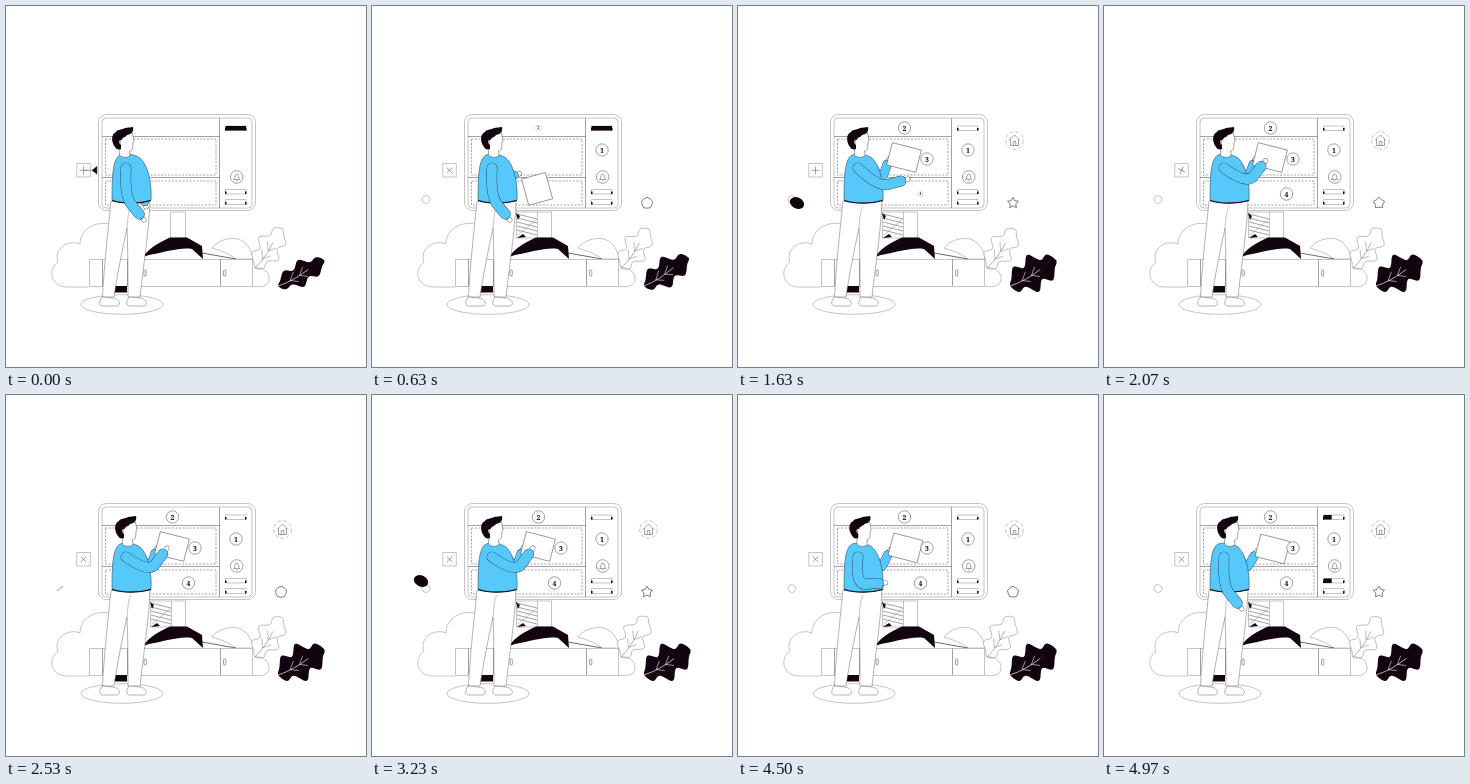
An HTML page with a canvas that plays this animation: 360 by 361 pixels, repeating every 5 s.

```html
<!DOCTYPE html>
<html lang="en">
<head>
<meta charset="utf-8">
<title>Planning a page layout</title>
<style>
html, body { margin: 0; width: 100%; height: 100%; overflow: hidden; background: #fff; }
canvas { display: block; width: 360px; height: 361px; }
</style>
</head>
<body>
<canvas id="stage"></canvas>
<script>
const LOOP = 5000, TAU = Math.PI * 2;
const INK = '#13050f', BLUE = '#56c8fa', LINE = '#444', SOFT = '#888';
const canvas = document.getElementById('stage');
const c = canvas.getContext('2d');
const dpr = window.devicePixelRatio || 1;
canvas.width = 360 * dpr;
canvas.height = 361 * dpr;

let t = 0; // time within the loop, in ms

const clamp = u => Math.max(0, Math.min(1, u));
const ease = u => u * u * (3 - 2 * u);
const ramp = (from, to) => ease(clamp((t - from) / (to - from)));
const pulse = (mid, half) => ease(clamp(1 - Math.abs(t - mid) / half));
const mix = (a, b, u) => a.map((v, i) => v + (b[i] - v) * u);

// Scale that grows with a small overshoot.
function pop(start) {
  const u = clamp((t - start) / 400) - 1;
  return 1 + 2.4 * u ** 3 + 1.4 * u ** 2;
}

function shape(d, fill, stroke = LINE, width = 0.5) {
  const p = typeof d === 'string' ? new Path2D(d) : d;
  if (fill) { c.fillStyle = fill; c.fill(p); }
  if (stroke) { c.strokeStyle = stroke; c.lineWidth = width; c.stroke(p); }
}

function box(x, y, w, h, fill, r = 0, stroke = LINE) {
  const p = new Path2D();
  p.roundRect(x, y, w, h, r);
  shape(p, fill, stroke);
}

function oval(x, y, rx, ry, fill, stroke = LINE, turn = 0) {
  const p = new Path2D();
  p.ellipse(x, y, rx, ry, turn, 0, TAU);
  shape(p, fill, stroke);
}

function at(x, y, turn, scale, draw) {
  if (scale <= 0) return;
  c.save();
  c.translate(x, y);
  c.rotate(turn);
  c.scale(scale, scale);
  draw();
  c.restore();
}

function badge(n, x, y) {
  at(x, y, 0, pop(80 + 503 * (n - 1)), () => {
    oval(0, 0, 6.2, 6.2, '#fff');
    c.fillStyle = INK;
    c.font = 'bold 7px "Noto Serif", "Liberation Serif", serif';
    c.textAlign = 'center';
    c.fillText(n, 0, 2.6);
  });
}

// A form field with dark ends and a fill running from the left.
function field(y, h, fill) {
  box(219.5, y, 20.5, h, '#fff', 0, SOFT);
  c.fillStyle = INK;
  c.fillRect(219.5, y, 20.5 * fill, h);
  for (const x of [219, 239]) c.fillRect(x, y + h - 2.5, 1.5, 2.5);
}

function monitor() {
  box(92.5, 108.5, 157, 96, '#fff', 8, SOFT);
  box(96, 112, 150, 90, '#fff', 4, SOFT);
  shape('M96 130.5H213.5M96 171.5H213.5M213.5 112V202');
  c.setLineDash([2, 1.5]);
  box(99.5, 133, 110.5, 36);
  box(99.5, 175, 110.5, 24);
  c.setLineDash([]);
  const refill = 0.4 * ramp(4750, 4970);
  field(120, 4.5, 1 - ramp(800, 1150) + refill);
  field(183.5, 4.5, refill);
  field(193.5, 5, 0);
  oval(230.7, 171, 6.3, 6.3, '#fff');
  shape('M227.5 173.5q1.4 -1 1.4 -3q0 -2.5 1.8 -2.5t1.8 2.5q0 2 1.4 3zM230 175h1.5');
}

function desk() {
  shape('M83 281H61C45 281 41 264 52 256C47 243 62 233 74 238C74 224 88 215 103 218', null, SOFT);
  oval(116, 298.5, 41, 9.8, '#fff', SOFT);
  box(164.5, 206, 15, 26, '#fff', 0, SOFT);
  if (t > 250) {
    box(144.5, 206, 21, 26, '#fff', 0, SOFT);
    for (let y = 208; y < 228; y += 4) shape(`M145 ${y}L165 ${y + 5}`);
    shape('M146 229L165 213', null, SOFT);
    shape('M144 207l4 3-2 4zM145 232l6 -4 3 3z', INK, null);
  }
  shape('M137 251C143 242 154 236 164 231.5H181L196 240L197 253L186 243C174 241 160 246 143 249Z', INK, null);
  shape('M206 242C211 235 222 231 232 233C241 236 246 244 247 253H230C222 247 215 245 206 242Z', '#fff', SOFT);
  shape('M196 247L230 253', null, LINE, 0.8);
  box(83.5, 253.5, 163, 27, '#fff', 0, SOFT);
  shape('M96.5 253.5V280M121.5 253.5V280M214.5 253.5V280');
  for (const x of [138, 217.5]) box(x, 264, 2.3, 6, null, 1);
  c.fillStyle = INK;
  c.fillRect(108, 280, 13, 6.5);
}

// Lobed leaf growing from (x, y); the two edges ripple out of step.
function leaf(x, y, turn, length, width, fill, vein) {
  const edge = new Path2D(), steps = 40;
  for (let i = 0; i <= 2 * steps; i++) {
    const upper = i <= steps, u = (upper ? i : 2 * steps - i) / steps;
    const ripple = 1 + 0.33 * Math.cos(TAU * 2.8 * (u - (upper ? 0.57 : 0.42)));
    const half = width * Math.sin(Math.PI * u) ** 0.55 * ripple;
    edge.lineTo(length * u, upper ? -half : half);
  }
  edge.closePath();
  at(x, y, turn, 1, () => {
    shape(edge, fill, fill === INK ? null : SOFT);
    shape(`M0 0Q${length * 0.3} 3 ${length * 0.65} 0`, null, vein, 0.6);
    for (const u of [0.25, 0.45]) shape(`M${length * u} 1l7 -6m-7 6l7 5`, null, vein);
  });
}

function plant() {
  leaf(249, 262, -0.96 + 0.03 * Math.sin(TAU * t / LOOP), 48, 11, '#fff', SOFT);
  shape('M249 262C258 261 264 267 263 274C262 280 255 282 247 280', null, SOFT);
  leaf(272, 280, -0.5 - 0.06 * pulse(700, 700), 53, 10 + 4.5 * ramp(0, 1500), INK, '#fff');
}

function icons() {
  // Plus that turns into a cross and back
  box(70.8, 157.5, 13.5, 13.5, '#fff', 0, SOFT);
  const turned = ramp(100, 600) - ramp(1100, 1600) + ramp(1700, 2400);
  at(77.5, 164.3, turned * Math.PI / 4, 1, () => shape('M-4 0H4M0 -4V4'));
  at(91, 164.3, 0, 1 - ramp(0, 330), () => shape('M0 -4L-5 0L0 4ZM-5 0H-12', INK));

  // Turning disc that throws off a dark drop to either side
  const size = 4 * ramp(0, 500) * (1 - pulse(4030, 350));
  oval(54, 193.5, size * (1 - 0.9 * pulse(2530, 350)), size, null, SOFT, 0.9);
  for (const [mid, side] of [[1630, 1], [3230, -1]]) {
    const s = pulse(mid, 400);
    oval(54 + 5 * side * s, 191.5 + 5.5 * side * s, 7.5 * s, 5.5 * s, INK, null, 0.45);
  }

  // House
  at(276.5, 134.5, 0, pop(1050), () => {
    shape('M-5.5 0L0 -5.5L5.5 0M-4 -1.5V5H4V-1.5M-1.3 5V1H1.3V5');
    c.setLineDash([4, 2]);
    const ring = 8.8 * (1 - pulse(4030, 350));
    oval(0, 0, ring, ring, null, SOFT);
    c.setLineDash([]);
  });

  // Star that swells towards a pentagon
  const inner = 0.7 - 0.2 * Math.cos(TAU * (t - 1630) / 1800);
  at(275, 197, 0, pop(200), () => {
    const p = new Path2D();
    for (let i = 0; i < 10; i++) {
      const a = i * TAU / 10 - TAU / 4, r = i % 2 ? 5.8 * inner : 5.8;
      p.lineTo(r * Math.cos(a), r * Math.sin(a));
    }
    p.closePath();
    shape(p, null, LINE, 0.7);
  });
}

// Two-bone arm: the elbow follows from the shoulder and the hand.
function arm(shoulder, hand, upper, lower, width) {
  const [sx, sy] = shoulder;
  const dx = hand[0] - sx, dy = hand[1] - sy, d = Math.hypot(dx, dy);
  const along = (upper ** 2 - lower ** 2 + d ** 2) / (2 * d);
  const out = Math.sqrt(Math.max(0, upper ** 2 - along ** 2));
  const elbow = [sx + (dx * along - dy * out) / d, sy + (dy * along + dx * out) / d];
  const cuff = mix(elbow, hand, 0.76), bend = mix(elbow, hand, 0.35);
  const sleeve = `M${shoulder}Q${elbow} ${bend}L${cuff}`;
  const palm = `M${cuff}L${hand}`;
  c.lineCap = c.lineJoin = 'round';
  shape(palm, null, LINE, 4.8);
  shape(palm, null, '#fff', 4);
  shape(sleeve, null, '#234', width + 0.7);
  shape(sleeve, null, BLUE, width);
  c.lineCap = 'butt';
  c.lineJoin = 'miter';
}

function paper(end) {
  if (t < 180) return;
  const lift = ramp(180, 1050);
  const [x, y, turn, w, h] = mix([164, 218, -0.85, 19, 32], [166, 151.5, 0.25, 30, 23], lift);
  at(x + 2.5 * end, y + 2.5 * end, turn, 1, () => box(-w / 2, -h / 2, w, h, '#fff'));
}

function person() {
  const end = ramp(4200, 4750);
  const rest = [138, 214];
  let front = mix(rest, [170, 173], ramp(1050, 1600));
  front = mix(front, [161, 153], ramp(1700, 2150));
  front = mix(front, rest, end);
  const back = mix([140, 201], [151 + 2 * end, 153 + 3 * end], ramp(0, 1000));

  // Legs and shoes
  shape('M105 195C102 225 98 260 96.5 291H108C111 270 116 245 121 222C122 245 122 268 122 291H134C137 262 143 225 144 195Z', '#fff', '#666');
  shape('M121 222C122 212 122 206 125 200', null, SOFT);
  for (const x of [0, 27]) {
    shape(`M${96 + x} 291C${93 + x} 296 ${93 + x} 299 ${96 + x} 300H${111 + x}C${115 + x} 299 ${114 + x} 293 ${107 + x} 292Z`, '#fff', '#666');
  }

  arm([135, 162], back, 16, 24, 8.5);
  paper(end);
  shape('M114 149C107 153 106 168 106 194C117 198 133 198 145 194C146 180 143 160 134 152C128 148 120 147 114 149Z', BLUE, '#234');
  shape('M106 194.5C117 198 133 198 145 194.5', null, INK, 1.3);

  at(-3 + 3 * ramp(0, 630) + 4 * end, 0, 0, 1, () => {
    shape('M117 139L116.5 149C119 152 125 152 127 149.5L126.5 145C130 145 130 140 129.8 137L131 135L129.5 127H118Z', '#fff');
    shape('M112 141C108 136 108 128 113 126C114 123 120 124 122 122L130 121C131 125 129 128 124 129C122 132 119 131 119 134C116 133 115 137 118 139L118 143C115 144 113 143 112 141Z', INK, null);
  });
  arm([120, 162], front, 28, 31, 10);
}

function draw(now) {
  t = now % LOOP;
  c.setTransform(dpr, 0, 0, dpr, 0, 0);
  c.fillStyle = '#fff';
  c.fillRect(0, 0, 360, 361);
  monitor();
  desk();
  plant();
  icons();
  person();
  badge(1, 230, 144);
  badge(2, 166.5, 122);
  badge(3, 189, 153);
  badge(4, 182.5, 188);
}

const start = performance.now();
function tick() {
  draw(performance.now() - start);
  requestAnimationFrame(tick);
}
tick();
</script>
</body>
</html>
```
